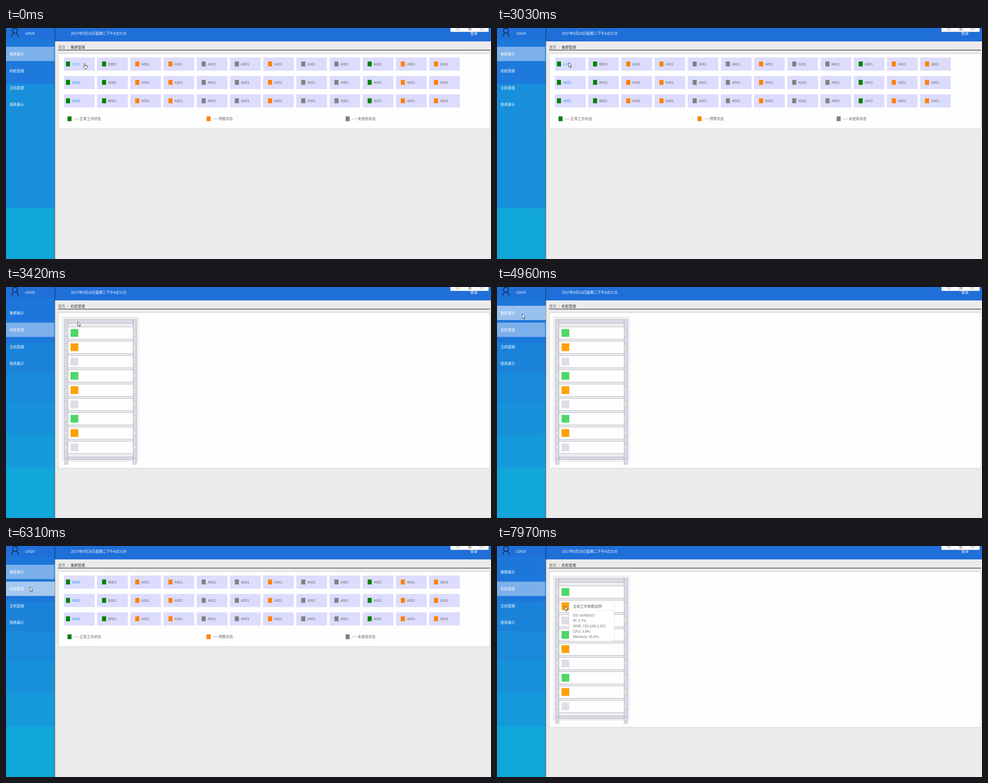
These frames come from a looping animation (1084 by 517 pixels, 8000 ms). An HTML page:

```html
<!DOCTYPE html>
<html>
<head>
<meta charset="utf-8">
<title>Cluster console</title>
<style>
html, body { margin: 0; width: 100%; height: 100%; overflow: hidden; background: #ebebeb; }
svg { display: block; width: 1084px; height: 517px; }
text { font: 8px "Noto Sans CJK SC", "Noto Sans CJK", "Noto Sans", sans-serif; white-space: pre; }
</style>
</head>
<body>
<svg id="stage" viewBox="0 0 1084 517" xmlns="http://www.w3.org/2000/svg"></svg>
<script>
const NS = 'http://www.w3.org/2000/svg';
const LOOP = 8000;
const BLUE = '#1890ff', GREY = '#666';
const stage = document.getElementById('stage');

function add(parent, tag, attrs = {}) {
  const el = document.createElementNS(NS, tag);
  for (const key in attrs) el.setAttribute(key, attrs[key]);
  parent.appendChild(el);
  return el;
}
const group = (parent = stage) => add(parent, 'g');
const rect = (p, x, y, width, height, fill, more = {}) =>
  add(p, 'rect', { x, y, width, height, fill, ...more });
const path = (p, d, stroke, width = 1, fill = 'none') =>
  add(p, 'path', { d, stroke, fill, 'stroke-width': width });
// y is the vertical middle of the line
function label(p, x, y, str, fill, more = {}) {
  const el = add(p, 'text', { x, y: y + 3, fill, ...more });
  el.textContent = str;
  return el;
}
const show = (el, on) => el.setAttribute('visibility', on ? 'visible' : 'hidden');

// Sidebar and header
function bands(list) {
  const g = group();
  list.forEach(([y, fill], i) => {
    const end = i + 1 < list.length ? list[i + 1][0] : 517;
    rect(g, 0, y, 109, end - y, fill);
  });
  return g;
}
rect(stage, 0, 0, 1084, 517, '#ebebeb');
rect(stage, 109, 0, 975, 30, '#1f6fd9');
const coarse = bands([[0, '#1f70d8'], [25, '#1d79db'], [125, '#178fda'], [403, '#11a6da']]);
const fine = bands([[0, '#1f70d8'], [25, '#1d77da'], [125, '#1b82da'], [190, '#198ada'],
  [257, '#1792da'], [331, '#149ada'], [404, '#11a6da']]);
rect(stage, 108, 0, 1, 517, '#000', { opacity: .3 });
rect(stage, 109, 0, 1, 517, '#000', { opacity: .28 });
rect(stage, 110, 0, 1, 517, '#000', { opacity: .08 });

path(stage, 'M17.2 10.9A5.6 5.6 0 1 1 22.8 10.9M12.6 19.5C13 14.5 16 11.4 20 11.4S27 14.5 27.4 19.5', '#10233c', 1.5);
label(stage, 43, 12, 'LOGO', '#fff');
label(stage, 145, 12, '2017年9月26日星期二下午4点31分', '#fff');
label(stage, 1037.5, 12, '登录', '#fff', { style: 'font-size:8.3px' });

rect(stage, 993.5, -4, 85, 12.5, '#fdfdfd', { rx: 1, stroke: '#c9cdd3', 'stroke-width': .7 });
path(stage, 'M1006.4 0A3.8 3.8 0 1 0 1013.6 0M1010 0V3M1034 .5H1040M1034 2.5H1040M1034 5H1040M1034 0V5M1037 0V5M1040 2.5V5' +
  'M1059.2 0V2.6L1063 5.4L1066.8 2.6V0M1061.4 .3A1.8 1.8 0 0 0 1064.6 .3', '#858585', .8);

const menu = ['集群展示', '机柜管理', '主机管理', '图表展示'].map((name, i) => {
  const y = 42 + i * 37.7;
  const item = { mid: y + 16 };
  if (i < 2) {
    item.fill = rect(stage, 0, y, 109, 32, '#fff', { opacity: 0 });
    item.bar = rect(stage, 107.3, y, 1.7, 0, BLUE);
  }
  label(stage, 8, y + 16.3, name, '#fff', { 'font-weight': 500 });
  return item;
});

function setItem(item, alpha, bar) {
  item.fill.setAttribute('opacity', alpha);
  item.bar.setAttribute('height', bar);
  item.bar.setAttribute('y', item.mid - bar / 2);
}

// Breadcrumb
label(stage, 116.5, 43.3, '首页', GREY);
label(stage, 137.3, 43.3, '/', '#999');
const crumb = label(stage, 144.5, 43.3, '', '#333', { 'font-weight': 500 });
rect(stage, 116, 48.8, 966, 1.3, '#333');

const panel = (p, height) =>
  rect(p, 117, 57.4, 964.8, height, '#fefefe', { rx: 2, stroke: '#c6c6c6', 'stroke-width': .8 });

// Cluster page
const COLOR = { g: '#008000', o: '#ff8000', s: '#808080' };
const cluster = group();
panel(cluster, 167.8);
let hoverLink;
for (let row = 0; row < 3; row++) {
  const y = 66 + row * 41.2;
  [...'ggoossossgoo'].forEach((state, col) => {
    const x = 129.5 + col * 74.2;
    const inset = col ? 11 : 4.5;
    const name = (col === 1 ? 'B00' : 'A00') + (col < 2 ? 3 - row : 1);
    rect(cluster, x, y, 68.5, 29.5, '#dcdcfe');
    rect(cluster, x + inset, y + 9, 9, 11, COLOR[state]);
    const text = label(cluster, x + inset + 13.7, y + 14.7, name, col ? GREY : BLUE);
    if (!row && !col) hoverLink = text;
  });
}
[['g', '正常工作状态'], ['o', '预警状态'], ['s', '未使用状态']].forEach(([state, name], i) => {
  const x = 137.5 + i * 310.8;
  rect(cluster, x, 197.8, 9, 10.7, COLOR[state]);
  label(cluster, x + 13.5, 203.4, '——' + name, GREY);
});

// Rack page
const rack = group();
panel(rack, 348.4);
rect(rack, 125, 66, 172, 325, '#eeeef1');
const EDGE = { stroke: '#a8a8b6', 'stroke-width': .9 };
const POST = '#dcdce7';
rect(rack, 138, 73, 146, 8, POST, EDGE);
rect(rack, 138, 380.5, 146, 5.5, POST, EDGE);
for (const x of [131.2, 284.2]) {
  rect(rack, x, 73, 7, 310, POST, EDGE);
  rect(rack, x, 383, 7, 14, POST, EDGE);
}
for (let i = 0; i < 9; i++) {
  const y = 89.2 + i * 32;
  rect(rack, 138.2, y, 146, 27.6, '#fefefe', EDGE);
  rect(rack, 144.3, y + 5, 17.3, 17.3, ['#4fd667', '#ffa005', '#dcdfe5'][i % 3]);
  for (const x of [131.7, 284.7]) {
    rect(rack, x, y + 6.3, 6, 14.6, '#eeeef2', { ...EDGE, 'stroke-width': .7 });
    for (const dy of [10.5, 17])
      add(rack, 'circle', { cx: x + 3, cy: y + dy, r: 1, fill: '#b9b9c4', stroke: '#a0a0ad', 'stroke-width': .4 });
  }
}

const popover = group();
rect(popover, 160.3, 124.8, 102.4, 89, '#000', { rx: 2.5, opacity: .1 });
rect(popover, 161, 125, 101, 88, '#fff', { rx: 2, stroke: '#d4d4d4', 'stroke-width': .5 });
rect(popover, 161, 143.6, 101, .7, '#e4e4e4');
const details = group(popover);
label(details, 170, 135, '主机工作参数说明', '#555');
['OS: centous7', 'IP: 0.7%', 'DISK: 192.168.1.101', 'CPU: 3.8%', 'Memory: 35.5%']
  .forEach((line, i) => label(details, 170, 155.2 + i * 12, line, GREY));

// Pointers, both with the tip at the origin
const pointer = group();
const arrow = path(pointer, 'M.3 .4V10.4L2.6 8.3L4.3 12.2L6 11.4L4.3 7.7H7Z', '#222', .8, '#fff');
const hand = path(pointer, 'M-.2 7.7V1.4Q-.2 .4 .9 .4T2 1.4V4.5Q3.3 3.8 3.8 5Q5 4.4 5.4 5.5Q6.9 5.1 6.9 6.6V8.8' +
  'Q6.9 10 6 11V12H.7V11.3L-2.5 7.7Q-2.9 6.6-1.8 6.4Q-1.1 6.4-.2 7.7ZM2 4.5V6.8M3.8 5V7M5.4 5.5V7.2', '#222', .8, '#fff');

// Held states: [start, ...values]
const moves = [
  [0, 175, 79, 'hand'], [150, 169, 78, 'hand'], [270, 164, 77, 'hand'], [580, 162, 77, 'hand'],
  [730, 160, 77, 'hand'], [3030, 160, 77, 'arrow'],
  [4390, 122, 76, 'arrow'], [4510, 83, 72, 'hand'], [4660, 71, 69, 'hand'], [4810, 56, 60, 'hand'],
  [4960, 56, 60, 'arrow'], [5080, 56, 60, 'hand'], [5630, 55, 74, 'hand'], [5750, 53, 91, 'hand'],
  [6310, 53, 91, 'arrow'], [6460, 53, 91, 'hand'],
  [6880, 90, 124, 'hand'], [7030, 140, 115, 'arrow'], [7150, 174, 106, 'arrow'],
  [7300, 152, 104, 'arrow'], [7850, 152, 121, 'arrow'], [7970, 151.5, 134, 'arrow']
];
const pages = [
  [0, 'cluster'], [3150, 'blank'], [3300, 'rack'], [5080, 'cluster'], [6460, 'rack']
];
// first item alpha and bar, second item alpha and bar
const marks = [
  [0, .42, 32, 0, 0], [3150, .33, 25, .12, 6], [3300, .1, 0, .34, 26], [3420, 0, 0, .42, 32],
  [4960, .55, 0, .42, 32], [5080, .73, 6, .33, 25], [5230, .55, 26, .1, 0], [5350, .42, 32, 0, 0],
  [6180, .42, 32, .3, 0], [6310, .42, 32, .6, 0], [6460, .34, 25, .73, 6], [6610, 0, 0, .42, 32]
];
const fades = [[0, 0, 0], [7300, .45, .45], [7420, 1, .8], [7570, 1, 1]];

function at(track, t) {
  let cur = track[0];
  for (const step of track) if (step[0] <= t) cur = step;
  return cur.slice(1);
}

function render(t) {
  const [page] = at(pages, t);
  show(cluster, page === 'cluster');
  show(rack, page === 'rack');
  crumb.textContent = page === 'cluster' ? '集群管理' : '机柜管理';
  show(coarse, t < 3150);
  show(fine, t >= 3150);
  hoverLink.setAttribute('fill', t < 3150 ? '#5eabff' : BLUE);

  const [a0, b0, a1, b1] = at(marks, t);
  setItem(menu[0], a0, b0);
  setItem(menu[1], a1, b1);

  const [box, text] = at(fades, t);
  popover.setAttribute('opacity', box);
  details.setAttribute('opacity', text);

  const [x, y, kind] = at(moves, t);
  pointer.setAttribute('transform', `translate(${x} ${y})`);
  show(arrow, kind === 'arrow');
  show(hand, kind === 'hand');
}

const start = performance.now();
function tick() {
  render((performance.now() - start) % LOOP);
  requestAnimationFrame(tick);
}
tick();
</script>
</body>
</html>
```
